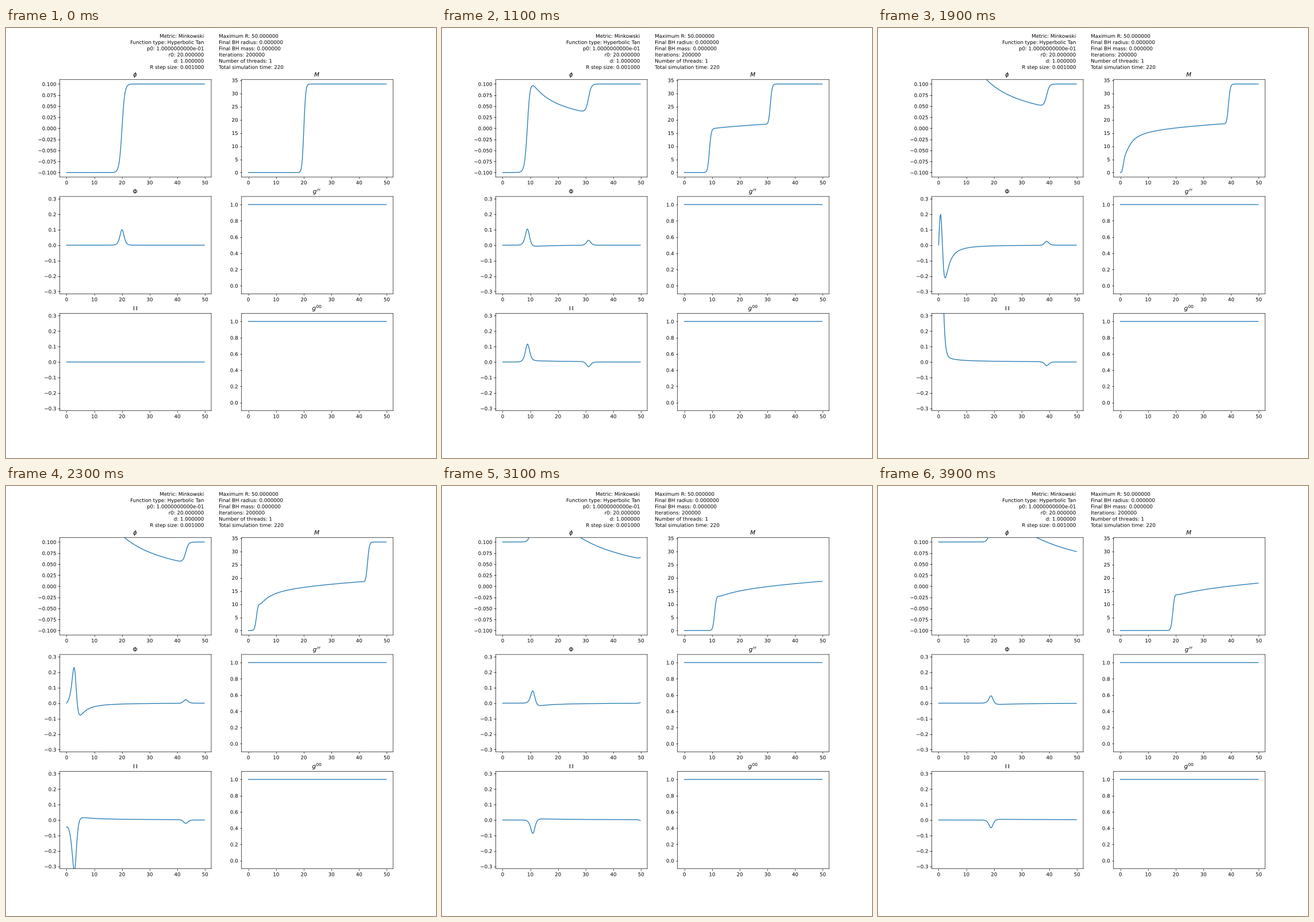
A matplotlib script that plays this animation: 748x748 px, repeating every 4000 ms.

```python
import numpy as np
import matplotlib.pyplot as plt
from matplotlib.animation import FuncAnimation
from matplotlib.patheffects import Normal

SIZE = 748
INCHES = 12
FRAMES = 40
P0, R0 = 0.1, 20.0

# Fine grid for the mass integral, plotted at every 25th point
DR, STRIDE = 0.01, 25
r = np.arange(4976) * DR
r[0] = 1e-3  # avoids division by zero at the centre

plt.rcParams["font.family"] = "DejaVu Sans"
plt.rcParams["mathtext.fontset"] = "dejavusans"

# Subpixel placement: no snapped lines, text filled as outlines
plt.rcParams["path.snap"] = False
plt.rcParams["path.effects"] = [Normal()]
plt.rcParams["text.hinting"] = "none"


def wave(x):
    """Odd function f = x * phi(|x|, 0) and its derivative."""
    a = np.abs(x)
    th = np.tanh(a - R0)
    return P0 * x * th, P0 * (th + a * (1 - th**2))


def fields(t):
    """Exact spherical wave: phi, M, Phi = dphi/dr and Pi = dphi/dt."""
    f_in, df_in = wave(r + t)
    f_out, df_out = wave(r - t)
    phi = (f_in + f_out) / (2 * r)
    grad = (df_in + df_out) / (2 * r) - phi / r
    rate = (df_in - df_out) / (2 * r)
    density = 2 * np.pi * r**2 * (grad**2 + rate**2)
    mass = np.concatenate(([0], np.cumsum((density[1:] + density[:-1]) / 2 * DR)))
    return [v[::STRIDE] for v in (phi, mass, grad, rate)]


fig, axes = plt.subplots(3, 2, figsize=(INCHES, INCHES), dpi=SIZE / INCHES,
                         facecolor="white")
fig.subplots_adjust(left=0.125, right=0.9, bottom=0.11, top=0.88,
                    wspace=0.2, hspace=0.2)

x = r[::STRIDE]
start = fields(0)
ones = np.ones_like(x)


def panel(ax, title, y, low, high):
    """Line plot with fixed limits."""
    ax.set_title(title)
    ax.set_xlim(-0.05 * x[-1], 1.05 * x[-1])
    ax.set_ylim(low, high)
    return ax.plot(x, y, color="#1f77b4", lw=1.5)[0]


top_mass = start[1][-1]
lines = [
    panel(axes[0, 0], r"$\phi$", start[0], -1.1 * P0, 1.1 * P0),
    panel(axes[0, 1], r"$M$", start[1], -0.05 * top_mass, 1.05 * top_mass),
    panel(axes[1, 0], r"$\Phi$", start[2], -0.315, 0.315),
    panel(axes[2, 0], r"$\Pi$", start[3], -0.315, 0.315),
]
panel(axes[1, 1], r"$g^{rr}$", ones, -0.1, 1.1)
panel(axes[2, 1], r"$g^{00}$", ones, -0.1, 1.1)

LEFT = ["Metric: Minkowski", "Function type: Hyperbolic Tan",
        "p0: 1.0000000000e-01", "r0: 20.000000", "d: 1.000000",
        "R step size: 0.001000"]
RIGHT = ["Maximum R: 50.000000", "Final BH radius: 0.000000",
         "Final BH mass: 0.000000", "Iterations: 200000",
         "Number of threads: 1", "Total simulation time: 220"]

for i, (a, b) in enumerate(zip(LEFT, RIGHT)):
    y = 1 - (17.0 + 10.84 * i) / SIZE
    fig.text(0.46, y, a, ha="right", va="baseline", fontsize=10)
    fig.text(0.495, y, b, ha="left", va="baseline", fontsize=10)


def update(frame):
    for line, y in zip(lines, fields(frame)):
        line.set_ydata(y)
    return lines


anim = FuncAnimation(fig, update, frames=FRAMES, interval=100,
                     repeat=True, repeat_delay=0, blit=False)
plt.show()
```
